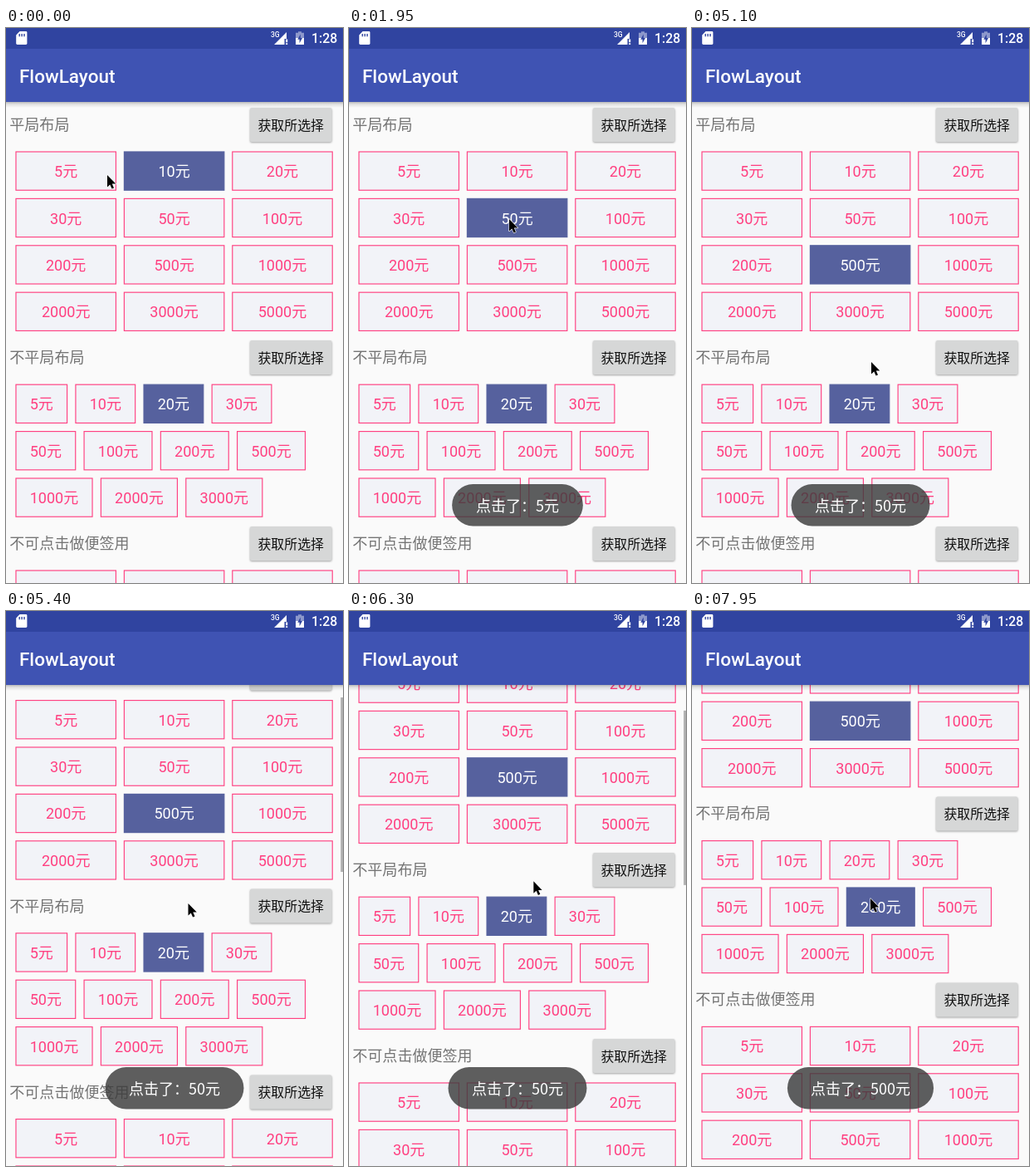
An HTML page for the animation above (8000 ms loop, 406 by 668 pixels).

```html
<!DOCTYPE html>
<html lang="zh-CN">
<head>
<meta charset="utf-8">
<title>FlowLayout</title>
<style>
html, body { margin: 0; width: 100%; height: 100%; overflow: hidden; background: #fafafa; }
svg { display: block; width: 100vw; height: 100vh; }
text { font: 18.05px Roboto, "Noto Sans CJK SC", "Noto Sans CJK", sans-serif; white-space: pre; }
.cell rect { fill: #f2f3f8; stroke: #ff4081; stroke-width: 1.15px; }
.cell text { fill: #ff4081; text-anchor: middle; }
.cell.on rect { fill: #56619e; stroke: #56619e; }
.cell.on text { fill: #fff; }
.head { fill: #747474; }
.btn rect { fill: #d6d7d7; filter: drop-shadow(0 1px 1.2px rgba(0,0,0,.35)); }
.btn text { fill: #111; font-size: 15.9px; font-weight: 500; text-anchor: middle; }
.toast rect { fill: rgba(60,60,60,.82); }
.toast text { fill: #fff; text-anchor: middle; font-family: "Noto Sans CJK SC", "Noto Sans CJK", sans-serif; }
.bar { fill: #fff; font-weight: 500; }
</style>
</head>
<body>
<svg id="stage" viewBox="0 0 406 668">
  <defs>
    <linearGradient id="shade" x2="0" y2="1">
      <stop offset="0" stop-opacity=".26"/>
      <stop offset=".4" stop-opacity=".1"/>
      <stop offset="1" stop-opacity="0"/>
    </linearGradient>
  </defs>
  <rect width="406" height="668" fill="#fafafa"/>
  <g id="content"></g>
  <rect id="thumb" x="403.2" y="89" width="2.8" height="210" fill="#000" fill-opacity=".3"/>
  <rect y="89" width="406" height="7" fill="url(#shade)"/>
  <rect width="406" height="89" fill="#3f53b3"/>
  <rect width="406" height="25" fill="#3044a0"/>
  <g fill="#fff">
    <path d="M16.5 4H24a1.4 1.4 0 0 1 1.4 1.4V18.6A1.4 1.4 0 0 1 24 20H13.6a1.4 1.4 0 0 1-1.4-1.4V8.6Z"/>
    <path d="M16.2 7v3.2M19.1 7v3.2M22 7v3.2" stroke="#3044a0" stroke-width="1.4"/>
    <path d="M338 5V13H335.5V20H323Z"/>
    <path d="M337.2 13.5h2v3.8h-2zM337.2 18.2h2v1.8h-2z"/>
    <path d="M352 4.2h4v1.6h3V20h-10V5.8h3Z" fill-opacity=".45"/>
    <path d="M349 12h10V20h-10Z"/>
    <path d="M354.8 7.5 351.3 13.7H353.6V18.3L357 12H354.8Z" fill="#3044a0"/>
  </g>
  <text class="bar" x="319" y="11" style="font-size:8.5px">3G</text>
  <text class="bar" x="368" y="18" style="font-size:15.8px">1:28</text>
  <text class="bar" x="16" y="66" style="font-size:22.5px">FlowLayout</text>
  <g id="toasts"></g>
  <path id="cursor" d="M0 0V14.5L3.3 11.5 5.6 16.6 8 15.5 5.8 10.6H10.3Z" fill="#000" stroke="#fff" stroke-width="1.1" paint-order="stroke" stroke-linejoin="round"/>
</svg>
<script>
const LOOP = 8000, STEP = 150, ROW = 56.4, LEFT = 11.4;
const $ = id => document.getElementById(id);

function add(parent, tag, attrs, text) {
  const el = document.createElementNS('http://www.w3.org/2000/svg', tag);
  for (const k in attrs) el.setAttribute(k, attrs[k]);
  if (text) el.textContent = text;
  parent.append(el);
  return el;
}

const content = $('content');

function addHead(title, y) {
  add(content, 'text', { class: 'head', x: 4.3, y: y + 27 }, title);
  const b = add(content, 'g', { class: 'btn' });
  add(b, 'rect', { x: 294, y, width: 98.5, height: 41, rx: 2 });
  add(b, 'text', { x: 343.2, y: y + 26.6 }, '获取所选择');
}

function addCell(n, x, y, w) {
  const g = add(content, 'g', { class: 'cell' });
  add(g, 'rect', { x: x + .58, y: y + .58, width: w - 1.15, height: 46.25 });
  add(g, 'text', { x: x + w / 2, y: y + 30.7 }, n + '元');
  return g;
}

function addGrid(title, y) {
  addHead(title, y);
  const amounts = [5, 10, 20, 30, 50, 100, 200, 500, 1000, 2000, 3000, 5000];
  return Object.fromEntries(amounts.map((n, i) =>
    [n, addCell(n, LEFT + i % 3 * 130.4, y + 52.4 + Math.floor(i / 3) * ROW, 121.6)]));
}

function addFlow(title, y) {
  addHead(title, y);
  const cells = {};
  [[5, 10, 20, 30], [50, 100, 200, 500], [1000, 2000, 3000]].forEach((row, r) => {
    let x = LEFT;
    for (const n of row) {
      const w = 52.6 + 10.15 * String(n).length;
      cells[n] = addCell(n, x, y + 52.6 + r * ROW, w);
      x += w + 9.2;
    }
  });
  return cells;
}

const even = addGrid('平局布局', 96);
const flow = addFlow('不平局布局', 376);
addGrid('不可点击做便签用', 600);

// [amount, fade in, fade out]
const toasts = [[5, 560, 4000], [50, 4060, 7450], [500, 7520, 1e5]].map(([n, start, end]) => {
  const w = 148.5 + 9.2 * String(n).length;
  const el = add($('toasts'), 'g', { class: 'toast' });
  add(el, 'rect', { x: 203 - w / 2, y: 549, width: w, height: 50.5, rx: 25.2 });
  add(el, 'text', { x: 203, y: 581.5 }, '点击了：' + n + '元');
  return { el, start, end };
});

// [time, values...]
const cursorKeys = [
  [0, 122, 177], [150, 100, 178], [450, 100, 178], [1350, 193, 230], [3000, 193, 230],
  [4200, 188, 305], [4500, 188, 305], [5100, 216, 402], [5250, 218, 383], [5400, 219.5, 352],
  [5550, 219.5, 352], [6000, 222, 381], [6150, 222, 368], [6600, 223, 240],
  [6750, 223, 240], [7650, 215, 346]
];
const scrollKeys = [
  [5100, 0], [5250, 12], [5400, 41.4], [5700, 41.4], [6000, 35.6],
  [6150, 42], [6450, 128], [6600, 152], [6750, 152.6]
];
const evenPicks = [[0, 10], [450, 5], [1800, 50], [4350, 500]];
const flowPicks = [[0, 20], [7800, 200]];

const clamp = v => Math.min(1, Math.max(0, v));

function sample(keys, t) {
  const i = keys.findIndex(k => k[0] > t);
  if (i < 0) return keys.at(-1).slice(1);
  if (!i) return keys[0].slice(1);
  const a = keys[i - 1], b = keys[i], p = (t - a[0]) / (b[0] - a[0]);
  return a.slice(1).map((v, j) => v + (b[j + 1] - v) * p);
}

function pick(cells, picks, t) {
  const chosen = picks.findLast(p => p[0] <= t)[1];
  for (const n in cells) cells[n].classList.toggle('on', +n === chosen);
}

function draw(t) {
  const [x, y] = sample(cursorKeys, t), [scroll] = sample(scrollKeys, t);
  $('cursor').setAttribute('transform', `translate(${x} ${y})`);
  content.setAttribute('transform', `translate(0 ${-scroll})`);
  $('thumb').setAttribute('y', 89 + scroll * .363);
  $('thumb').setAttribute('opacity', t < 5250 ? 0 : 1 - clamp((t - 6900) / 250));
  pick(even, evenPicks, t);
  pick(flow, flowPicks, t);
  for (const { el, start, end } of toasts) {
    const rise = 1 - (1 - clamp((t - start) / 400)) ** 2;
    const fall = 1 - clamp((t - end) / 500) ** 2;
    el.setAttribute('opacity', rise * fall);
  }
}

const begin = performance.now();
function frame() {
  const t = (performance.now() - begin) % LOOP;
  draw(Math.floor(t / STEP) * STEP);
  requestAnimationFrame(frame);
}
frame();
</script>
</body>
</html>
```
